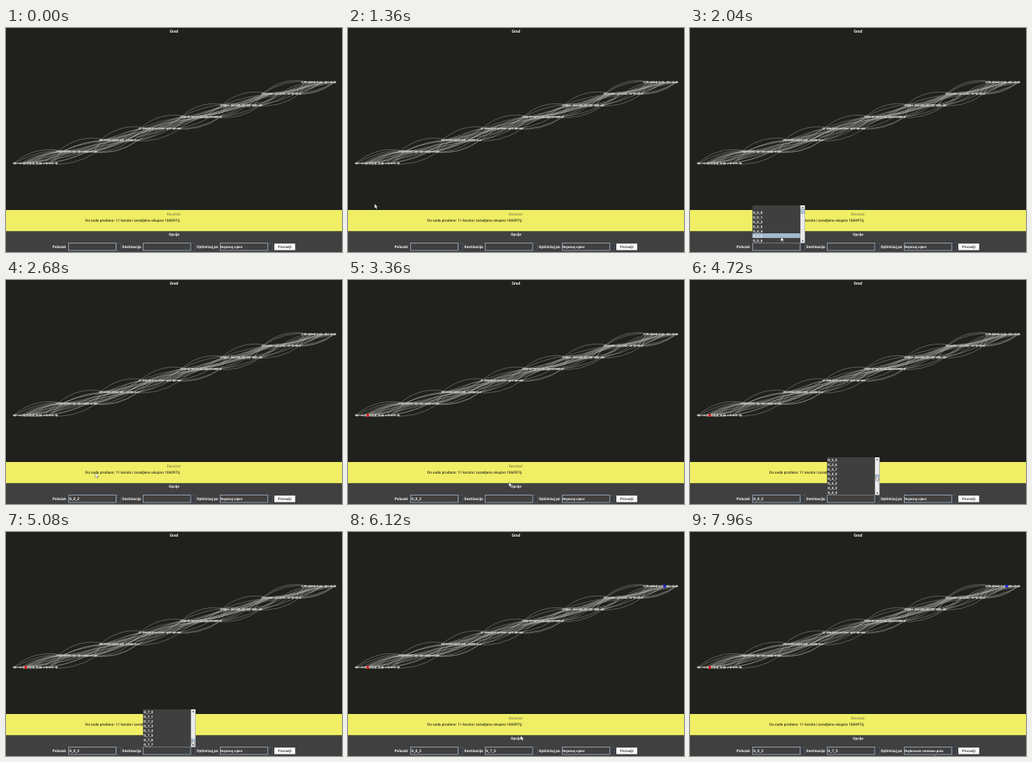
An HTML page that plays this animation: 432 px wide and 288 px high, repeating every 8000 ms.

```html
<!DOCTYPE html>
<html lang="sr">
<head>
<meta charset="utf-8">
<title>Grad</title>
<style>
  html, body { margin: 0; width: 100%; height: 100%; overflow: hidden; background: #20211c; }
  svg { display: block; width: 432px; height: 288px; }
  text { font: 500 4.8px Roboto, sans-serif; fill: #f2f2f2; text-rendering: geometricPrecision; }
  .center { text-anchor: middle; }
  .bold { font-weight: 700; }
  .dark { fill: #33331f; }
  .small { font-size: 4.4px; font-weight: 700; }
  .box { fill: #404040; stroke: #9fb0c2; stroke-width: .8; }
  .arrow { fill: #3a3d42; stroke: #555c66; stroke-width: .6; }
  #edges { fill: none; stroke: #b4b4ae; stroke-width: .55; stroke-opacity: .75; }
  #nodes { fill: #b9b9b5; }
</style>
</head>
<body>
<svg viewBox="0 0 432 288">
  <rect width="432" height="288" fill="#20211c"/>
  <text class="center bold" x="216" y="6" style="font-size:5.2px">Grad</text>
  <g id="edges"></g>
  <g id="nodes"></g>
  <circle id="start" cx="25.4" cy="174" r="1.9" fill="#e02020"/>
  <circle id="goal" cx="407" cy="69.7" r="1.9" fill="#2020e8"/>

  <rect y="234" width="432" height="27.5" fill="#f0ee64"/>
  <text class="center" x="215.5" y="240.8" style="font-weight:400;fill:#77763a">Rezultat</text>
  <text class="dark" x="102" y="249.3">Do sada prodano: 11 karata i zaradjeno ukupno 106097rj.</text>

  <rect y="261.5" width="432" height="26.5" fill="#404040"/>
  <text class="center bold" x="216" y="267.3">Opcije</text>
  <text class="bold" x="59.8" y="283">Polazak</text>
  <text class="bold" x="149.6" y="283">Destinacija</text>
  <text class="bold" x="245.3" y="283">Optimizuj po</text>
  <g id="fields"></g>
  <rect x="345" y="277.2" width="26.8" height="8.4" fill="#fafafa"/>
  <text class="center" x="358.4" y="283.2" style="fill:#333;font-size:4.6px">Pronadji</text>

  <g id="popup">
    <rect y="228" width="67.5" height="48.4" fill="#3f3f3f"/>
    <rect id="hover" width="61.5" height="6" fill="#a3b8cc"/>
    <g id="rows"></g>
    <rect x="61.6" y="228" width="5.8" height="48.4" fill="#e9eaec"/>
    <rect id="thumb" x="62.1" width="4.8" height="5.5" fill="#b4c6d8" stroke="#6e8296" stroke-width=".4"/>
    <path d="M63.2 231.5l1.3-1.7 1.3 1.7zM63.2 273.2l1.3 1.7 1.3-1.7z" fill="#333"/>
  </g>
  <path id="cursor" d="M0 0V6L1.4 4.8 2.4 7 3.3 6.6 2.4 4.5H4.2Z" fill="#fff" stroke="#222" stroke-width=".35"/>
</svg>
<script>
const LOOP = 8000, ROW = 6, TOP = 228;
const $ = id => document.getElementById(id);

function add(parent, tag, attrs, text = '') {
  const el = document.createElementNS('http://www.w3.org/2000/svg', tag);
  for (const key in attrs) el.setAttribute(key, attrs[key]);
  el.textContent = text;
  $(parent).append(el);
  return el;
}

let seed = 29;
const random = () => (seed = seed * 16807 % 2147483647) / 2147483647;

// City groups climb to the right as a staircase of stations.
const spans = [[10, 65], [66, 116], [121, 170], [172, 224], [225, 276], [277, 328], [330, 378], [381, 423]];
const cities = spans.map(([from, to], i) =>
  Array.from({ length: 16 }, (_, k) => {
    const inner = k > 0 && k < 15;
    return { x: from + (to - from) * (k + (inner ? random() - .5 : 0)) / 15, y: 174 - 14.9 * i };
  }));

function connect(a, b, bend) {
  const dx = b.x - a.x, dy = b.y - a.y;
  const cx = (a.x + b.x) / 2 + dy * bend, cy = (a.y + b.y) / 2 - dx * bend;
  add('edges', 'path', { d: `M${a.x} ${a.y}Q${cx} ${cy} ${b.x} ${b.y}` });
}

const pick = list => list[Math.floor(random() * list.length)];
cities.forEach((city, i) => {
  connect(city[0], city[15], 0);
  city.forEach(({ x, y }) => add('nodes', 'circle', { cx: x, cy: y, r: 1.1 + random() * .45 }));
  const next = cities[i + 1];
  if (!next) return;
  connect(city[0], next[3], .26);
  connect(city[12], next[15], -.2);
  for (let k = 0; k < 20; k++) connect(pick(city), pick(next), (random() - .48) * .44);
});

const [from, to, goalBy] = [80.5, 176.3, 275.4].map(x => {
  add('fields', 'rect', { class: 'box', x, y: 276.6, width: 61, height: 9.4 });
  add('fields', 'rect', { class: 'arrow', x: x + 61.8, y: 276.6, width: 5.4, height: 9.4 });
  return add('fields', 'text', { class: 'bold', x: x + .7, y: 283 });
});
goalBy.setAttribute('class', 'small');

const rows = Array.from({ length: 8 }, (_, i) =>
  add('rows', 'text', { class: 'bold', x: .7, y: TOP + 4.7 + i * ROW, style: 'font-size:4.5px' }));
const names = [''];
for (let i = 0; i < 64; i++) names.push(`G_${i >> 3}_${i % 8}`);

// Pointer stops: time, x, y. Gaps between trips are off stage.
const trips = [
  [[1200, 5, 284], [1320, 26, 222], [1480, 76, 246], [1640, 115, 280], [1840, 116, 280],
   [2040, 116.8, 268.5], [2280, 117, 257], [2480, 115, 248], [2680, 115, 248], [3000, 158, 252],
   [3360, 206.8, 259.8], [3480, 240, 280], [3680, 240, 280], [3880, 229, 260], [4080, 228, 248],
   [4240, 238, 240.5], [4360, 239, 236], [5080, 239.4, 268], [5200, 239.4, 268], [5440, 224, 266],
   [5640, 221, 261.5], [5840, 221, 261.5], [6120, 222, 261.8], [6360, 262, 274], [6560, 295.5, 282],
   [6720, 295.5, 282], [7080, 297, 289]],
  [[7900, 312, 288], [7960, 314, 286.2], [8000, 314, 286.2]]
];

const progress = (t, a, b) => Math.min(1, Math.max(0, (t - a) / (b - a)));

function pointer(t) {
  for (const stops of trips)
    for (let i = 1; i < stops.length; i++) {
      const [t0, x0, y0] = stops[i - 1], [t1, x1, y1] = stops[i];
      if (t < t0 || t >= t1) continue;
      const p = progress(t, t0, t1), e = p * p * (3 - 2 * p);
      return [x0 + (x1 - x0) * e, y0 + (y1 - y0) * e];
    }
  return null;
}

const show = (id, on) => $(id).style.display = on ? '' : 'none';

function draw(t) {
  const at = pointer(t);
  show('cursor', at);
  if (at) $('cursor').setAttribute('transform', `translate(${at})`);

  show('start', t >= 2700);
  show('goal', t >= 5840);
  from.textContent = t >= 2600 ? 'G_0_2' : '';
  to.textContent = t >= 5800 ? 'G_7_5' : '';
  goalBy.textContent = t >= 7720 ? 'Najkracem vremenu puta' : 'Najnizoj cijeni';

  const first = t >= 1800 && t < 2600, second = t >= 3680 && t < 5800;
  show('popup', first || second);
  if (!first && !second) return;
  $('popup').setAttribute('transform', `translate(${first ? 80.3 : 176.2})`);

  const drag = second ? progress(t, 4360, 5060) : 0;
  const scroll = drag * drag * (3 - 2 * drag);
  const offset = Math.round(scroll * (names.length - 8));
  rows.forEach((row, i) => row.textContent = names[offset + i]);
  $('thumb').setAttribute('y', 233 + scroll * 33);

  // The highlighted row stays put while the pointer is on the scrollbar.
  let line = Math.floor((at[1] - TOP) / ROW);
  if (second && t >= 4080 && t < 5240) line = 3 - offset;
  const visible = line >= 0 && line < 8;
  show('hover', visible);
  if (visible) $('hover').setAttribute('y', TOP + line * ROW);
}

function tick() {
  draw(performance.now() % LOOP);
  requestAnimationFrame(tick);
}
tick();
</script>
</body>
</html>
```
